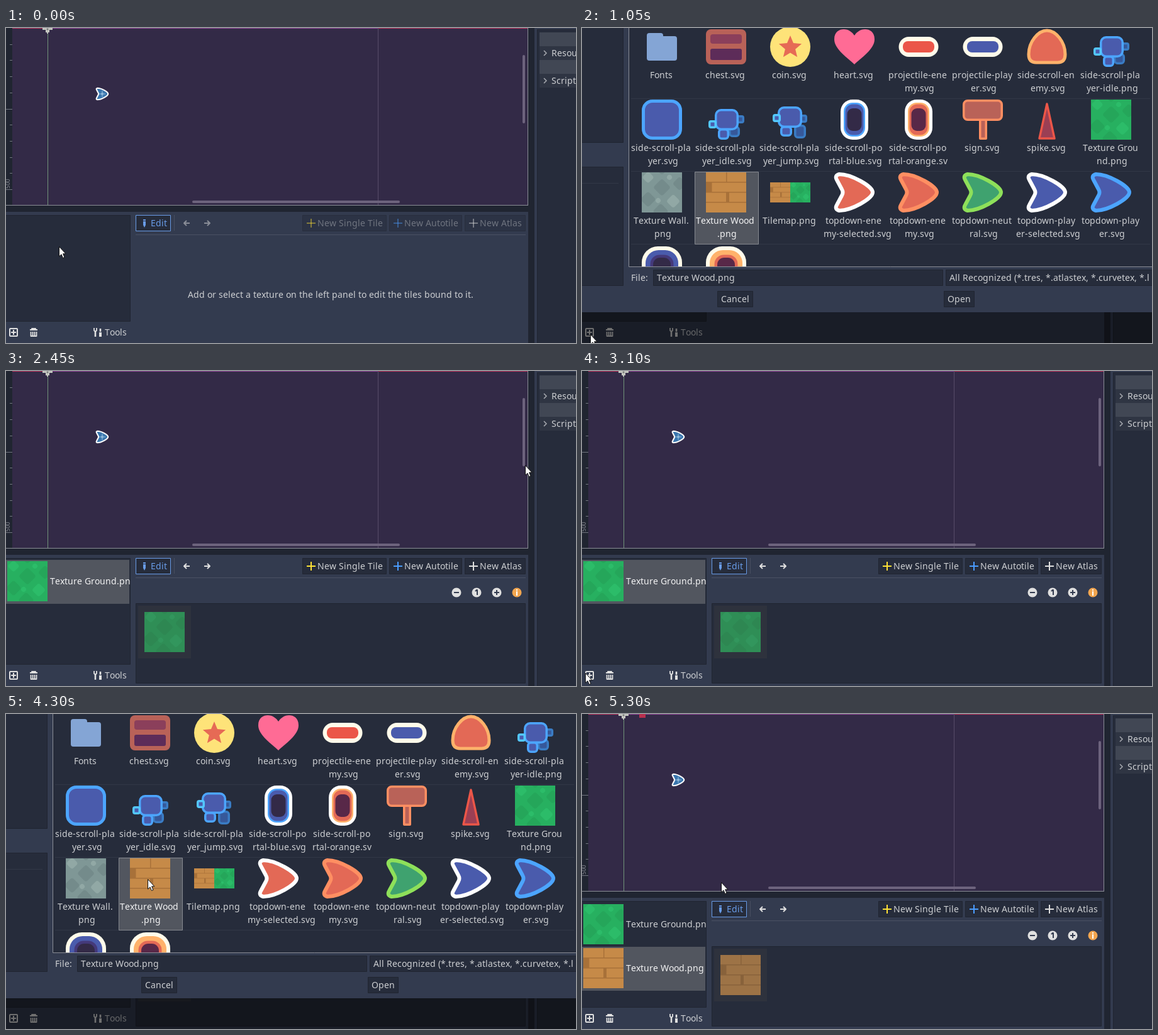
Write an HTML page with a canvas that moves like this. It is 906x502 px and loops after 5.35 s.

```html
<!DOCTYPE html>
<html lang="en">
<head>
<meta charset="utf-8">
<title>Adding textures to a tile set</title>
<style>
  html, body { margin: 0; width: 100%; height: 100%; overflow: hidden; background: #202531; }
  canvas { display: block; }
</style>
</head>
<body>
<canvas id="stage" width="906" height="502"></canvas>
<script>
const g = document.getElementById('stage').getContext('2d');
const LOOP = 5350, STEP = 50;
const BASE = '#333b4f', DARK = '#262c3b', DARKER = '#202531', FONT = '#cdcfd2', ICON = '#e0e0e0';
const ACCENT = '#699ce8', BLUE = '#4a5bac', SKY = '#4ca5ff', RED = '#e36956', ORANGE = '#ff8f62';
const AMBER = '#ffb26b', CREAM = '#fffbea', NIGHT = '#332a47', WINE = '#582848', BRICK = '#b96258';

// ---- drawing helpers ----
const rect = (x, y, w, h, color) => { g.fillStyle = color; g.fillRect(x, y, w, h); };

function box(x, y, w, h, r, fill, stroke, line = 1) {
  const inset = stroke ? line / 2 : 0;
  g.beginPath();
  g.roundRect(x + inset, y + inset, w - 2 * inset, h - 2 * inset, Math.max(0, r - inset));
  if (fill) { g.fillStyle = fill; g.fill(); }
  if (stroke) { g.strokeStyle = stroke; g.lineWidth = line; g.stroke(); }
}

function shape(d, x, y, fill, stroke, line = 2, scale = 1) {
  const path = new Path2D(d);
  g.save();
  g.translate(x, y);
  g.scale(scale, scale);
  g.lineJoin = 'round';
  if (fill) { g.fillStyle = fill; g.fill(path); }
  if (stroke) { g.strokeStyle = stroke; g.lineWidth = line; g.stroke(path); }
  g.restore();
}

function clipped(x, y, w, h, draw) {
  g.save();
  g.beginPath();
  g.rect(x, y, w, h);
  g.clip();
  draw();
  g.restore();
}

// Glyphs advance by whole pixels, as in the editor's hinted font.
const advance = c => Math.round(g.measureText(c).width);
const textWidth = s => [...s].reduce((w, c) => w + advance(c), 0);
function text(s, x, y, color = FONT) {
  g.fillStyle = color;
  for (const c of s) { g.fillText(c, x, y); x += advance(c); }
}

const disc = (x, y, r, color) => box(x - r, y - r, 2 * r, 2 * r, r, color);
const plus = (x, y, r, w, color) => {
  rect(x - r, y - w / 2, 2 * r, w, color);
  rect(x - w / 2, y - r, w, 2 * r, color);
};
// Concentric rounded boxes: [halfWidth, halfHeight, radius, color]
const nested = (x, y, layers) => layers.forEach(([w, h, r, color]) => box(x - w, y - h, 2 * w, 2 * h, r, color));

// ---- textures ----
function inTile(x, y, size, draw) {
  g.save();
  g.translate(x, y);
  g.scale(size / 64, size / 64);
  clipped(0, 0, 64, 64, draw);
  g.restore();
}

const stones = (base, dark, light) => (x, y, size = 64) => inTile(x, y, size, () => {
  rect(0, 0, 64, 64, base);
  const stone = (cx, cy, r, color) => {
    g.save();
    g.translate(cx, cy);
    g.rotate(Math.PI / 4);
    box(-r, -r, 2 * r, 2 * r, 4, color);
    g.restore();
  };
  [[32, 24, 10], [10, 43, 9], [60, 18, 8], [30, 62, 9], [32, -4, 6]].forEach(s => stone(...s, dark));
  [[10, 8, 7], [50, 46, 8], [44, 8, 4], [26, 45, 4]].forEach(s => stone(...s, light));
});
const ground = stones('#27b060', '#25a65a', '#2cbc69');
const wall = stones('#7f9796', '#748b8b', '#91a8a5');

const wood = (x, y, size = 64) => inTile(x, y, size, () => {
  rect(0, 0, 64, 64, '#c68a48');
  [15, 31, 47].forEach(row => rect(0, row, 64, 1.5, '#a87139'));
  rect(32, 0, 1.5, 16, '#a87139');
  rect(0, 16, 9.5, 15, '#a87139');
  rect(32, 32, 5, 15, '#a87139');
});

// ---- file icons, drawn around their centre ----
const SHIP = 'M-24-29C-5-29 29-10 29 0C29 10-5 29-24 29Q-32 27-28 20L-20 5Q-17 0-20-5L-28-20Q-32-27-24-29Z';
const ship = (fill, stroke) => (x, y) => shape(SHIP, x, y, fill, stroke, 6);
const pill = (outer, inner) => (x, y) => nested(x, y, [[31.5, 16, 16, outer], [25, 9, 8, inner]]);
const portal = (ring, body, core) => (x, y) =>
  nested(x, y, [[22, 32, 19, 'white'], [17, 27, 14, ring], [14.5, 24.5, 12, body], [11.5, 18, 9, core]]);
const dome = (...colors) => (x, y) => nested(x, y, colors.map((c, i) => {
  const r = [32, 26, 18.5, 14][i];
  return [r, r, r * .8, c];
}));

const part = (x, y, w, h, r, fill, stroke) => box(x, y, w, h, r, fill, stroke, 3.5);
function idle(x, y) {
  part(x + 16, y - 7, 13, 13, 4, '#36589a', '#3a7cc4');
  part(x + 4, y + 10, 18, 18, 6, '#36589a', '#3a7cc4');
  part(x - 18, y - 17, 38, 34, 10, BLUE, SKY);
  part(x - 28, y + 1, 13, 13, 4, BLUE, '#53c8ff');
  part(x - 13, y + 14, 18, 18, 6, BLUE, SKY);
}
function jump(x, y) {
  part(x + 15, y - 8, 12, 13, 4, '#36589a', '#3a7cc4');
  part(x + 6, y + 8, 19, 22, 6, '#36589a', '#3a7cc4');
  part(x - 20, y - 21, 39, 34, 10, BLUE, SKY);
  part(x - 28, y - 9, 13, 13, 4, BLUE, '#53c8ff');
  part(x - 16, y + 10, 19, 17, 6, BLUE, SKY);
}
const folder = (x, y) => {
  box(x - 24, y - 22, 26, 20, 4, '#84a5d5');
  box(x - 24, y - 17, 48, 39, 4, '#84a5d5');
};
const chest = (x, y) => {
  box(x - 32, y - 28, 64, 56, 8, BRICK);
  box(x - 25, y - 20, 50, 15, 4, '#8b3f5b');
  box(x - 25, y + 3, 50, 18, 3, '#5d2c59');
};
const coin = (x, y) => {
  disc(x, y, 32, '#fee379');
  const points = Array.from({ length: 10 }, (_, i) => {
    const a = i * Math.PI / 5, r = i % 2 ? 8.5 : 19;
    return `${r * Math.sin(a)} ${1 - r * Math.cos(a)}`;
  });
  shape(`M${points.join('L')}Z`, x, y, '#e66a55');
};
const heart = (x, y) => shape('M0 28C-10 18-32 4-32-12C-32-24-24-28-17-28C-9-28-3-23 0-18C3-23 9-28 17-28C24-28 32-24 32-12C32 4 10 18 0 28Z', x, y, '#ff6b95');
const blob = (x, y) => shape('M-17 25Q-29 25-29 12C-29-8-14-26 0-26C14-26 29-8 29 12Q29 25 17 25Z', x, y, RED, AMBER, 5);
const square = (x, y) => box(x - 32, y - 32, 64, 64, 17, BLUE, SKY, 5);
const sign = (x, y) => {
  box(x - 6, y - 2, 13, 34, 2, BRICK, ORANGE, 3.5);
  box(x - 32, y - 32, 64, 34, 8, BRICK, ORANGE, 3.5);
};
const spike = (x, y) => shape('M0-25L12 30H-12Z', x, y, '#9b3f54', '#eb5648', 3.5);
const tilemap = (x, y) => { wood(x - 32, y - 16, 32); ground(x, y - 16, 32); };
const tile = texture => (x, y) => texture(x - 32, y - 32);

const FILES = [
  ['Fonts', folder], ['chest.svg', chest], ['coin.svg', coin], ['heart.svg', heart],
  ['projectile-ene|my.svg', pill(CREAM, '#eb5648')], ['projectile-play|er.svg', pill(CREAM, BLUE)],
  ['side-scroll-en|emy.svg', blob], ['side-scroll-pla|yer-idle.png', idle],
  ['side-scroll-pla|yer.svg', square], ['side-scroll-pla|yer_idle.svg', idle], ['side-scroll-pla|yer_jump.svg', jump],
  ['side-scroll-po|rtal-blue.svg', portal(SKY, BLUE, NIGHT)], ['side-scroll-po|rtal-orange.sv', portal(AMBER, RED, WINE)],
  ['sign.svg', sign], ['spike.svg', spike], ['Texture Grou|nd.png', tile(ground)],
  ['Texture Wall.|png', tile(wall)], ['Texture Wood|.png', tile(wood)], ['Tilemap.png', tilemap],
  ['topdown-ene|my-selected.svg', ship(RED, 'white')], ['topdown-ene|my.svg', ship(RED, ORANGE)],
  ['topdown-neut|ral.svg', ship('#3fa26f', '#8ee05a')], ['topdown-play|er-selected.svg', ship(BLUE, 'white')],
  ['topdown-play|er.svg', ship(BLUE, SKY)],
  ['', dome(CREAM, BLUE, '#44397a', NIGHT)], ['', dome(CREAM, AMBER, RED, WINE)]
];
const GROUND = 15, WOOD = 17;

// ---- editor window ----
function viewport(hover) {
  rect(10, 0, 819, 282, NIGHT);
  for (let k = 1; k < 11; k++) {
    const long = k % 5 === 0;
    rect(long ? 0 : 6, Math.round(k * 25.7), long ? 10 : 4, 1, '#727680');
  }
  g.save();
  g.translate(6, 256);
  g.rotate(-Math.PI / 2);
  g.font = '9px "Noto Sans", sans-serif';
  g.fillStyle = '#8a8d94';
  g.fillText('500', 0, 0);
  g.restore();

  rect(10, 0, 819, 1, '#b9345a');
  rect(66, 0, 525, 1, '#8f4596');
  rect(591, 0, 1, 282, '#574d69');
  rect(66, 0, 1, 282, '#72957a');
  box(821, 43, 4, 109, 2, '#6d637d');
  box(296, 275, 330, 4, 2, '#6d637d');
  rect(0, 282, 830, 1, '#8b8e97');
  rect(829, 0, 1, 283, '#8b8e97');

  shape('M-8 0H8V3H3V7H1V9H-1V7H-3V3H-8Z', 66, 0, '#c4c6c0');
  disc(66, 2, 1.5, '#777a7a');
  if (hover) rect(91, 0, 10, 6, '#b9304f');
  shape(SHIP, 153, 105, '#3a76ae', 'white', 6.5, .32);
  plus(153, 105, 5, 1, '#8fb9da');
  disc(153, 105, 2, '#8fb9da');
}

function inspector() {
  rect(840, 0, 66, 502, BASE);
  rect(844, 2, 62, 500, DARKER);
  rect(845, 3, 61, 499, DARK);
  ['Resource', 'Script'].forEach((name, i) => {
    const y = 7 + 44 * i;
    rect(848, y, 58, 22, '#414754');
    rect(848, y + 22, 58, 22, '#2f3543');
    shape('M0-4L4 0L0 4', 855, y + 33, null, '#a6a9af', 1.6);
    text(name, 867, y + 38);
  });
}

function toolbar(active) {
  box(206, 298, 56, 26, 0, DARK, ACCENT);
  shape('M-2-6H2V3L0 7L-2 3Z', 220, 311, ACCENT);
  rect(218, 307, 4, 1, DARK);
  text('Edit', 230, 316, ACCENT);
  rect(267, 298, 1, 25, '#474e60');
  g.globalAlpha = active ? 1 : .5;
  shape('M5 0H-3M0-4L-4 0L0 4', 287, 311, null, ICON);
  shape('M-5 0H3M0-4L4 0L0 4', 320, 311, null, ICON);
  g.globalAlpha = 1;
  [[471, 134, 'New Single Tile', '#ffe236'], [609, 116, 'New Autotile', '#4a9cff'], [729, 97, 'New Atlas', ICON]]
    .forEach(([x, w, label, color]) => {
      box(x, 298, w, 26, 0, active ? DARK : '#2c3345', active ? DARKER : '#282e3d');
      g.globalAlpha = active ? 1 : .42;
      plus(x + 14, 311, 7, 2, color);
      text(label, x + 24, 316);
      g.globalAlpha = 1;
    });
  rect(206, 329, 620, 1, '#4a5163');
}

function textureEditor(texture) {
  [716, 748, 780].forEach(x => disc(x, 353, 7.5, ICON));
  rect(712, 352, 8, 2, BASE);
  shape('M-2-2L0-4H1V4', 748, 353, null, BASE);
  plus(780, 353, 4, 2, BASE);
  disc(812, 353, 7.5, '#f2a650');
  rect(811, 348, 2, 2, 'white');
  rect(811, 351, 2, 7, 'white');
  box(206, 370, 620, 128, 0, DARK, DARKER);
  texture(220, 384);
  rect(210, 374, 84, 84, 'rgba(64,64,64,.31)');
}

function textureList(items) {
  box(-1, 298, 199, 170, 0, DARK, DARKER);
  items.forEach(([name, texture], i) => {
    const y = 301 + 70 * i, selected = i === items.length - 1;
    if (selected) rect(0, y, 196, 70, '#52565f');
    texture(2, y + 2);
    clipped(0, y, 197, 70, () => text(name, 70, y + 39, selected ? '#f2f2f3' : FONT));
  });
  box(5, 478, 14, 14, 2, null, ICON, 2);
  plus(12, 485, 4, 2, ICON);
  shape('M-6-4H6M-3-5V-6H3V-5M-4.5-1V6H4.5V-1M-1.5-1V5M1.5-1V5', 44, 485, null, ICON, 1.8);
  shape('M-4-1V7M4-6V-1', 146, 485, null, ICON, 2.6);
  shape('M-6-7V-3L-4-1L-2-3V-7M4 1V7', 146, 485, null, ICON, 1.8);
  rect(148, 485, 4, 7, ICON);
  text('Tools', 157, 490);
}

function editor(items, hover) {
  rect(0, 0, 906, 502, DARKER);
  viewport(hover);
  inspector();
  rect(0, 293, 830, 209, BASE);
  textureList(items);
  toolbar(items.length > 0);
  if (items.length) textureEditor(items.at(-1)[1]);
  else text('Add or select a texture on the left panel to edit the tiles bound to it.', 289, 430);
}

// ---- file dialog ----
function fileCell([label, icon], index, selected) {
  const col = index % 8, row = index >> 3, x = 78 + 102 * col, y = 116 * row;
  if (selected) box(x - 1 + 2 * (col === 0), y - 3, 102, 116, 0, '#52565f', '#85888f');
  icon(127 + 102 * col, y + 30 + (row === 3 ? 2 : 0));
  label.split('|').forEach((line, i) => {
    const center = i && line.endsWith('g') ? 51 : 48;
    text(line, Math.max(x, Math.floor(x + center - textWidth(line) / 2)), y + 80 + 21 * i, selected ? '#f2f2f3' : FONT);
  });
}

function dialog(selected) {
  const field = (x, y, w, h) => box(x, y, w, h, 0, DARK, DARKER);
  rect(0, 0, 906, 502, 'rgba(0,0,0,.5)');
  rect(0, 0, 906, 453, BASE);
  field(-1, -1, 67, 184);
  field(-1, 221, 67, 190);
  rect(0, 247, 58, 1, '#323847');
  box(74, -2, 834, 383, 0, DARK, '#8b8e97');
  [112, 228, 344].forEach(y => rect(78, y, 825, 1, '#313746'));
  clipped(75, 0, 831, 380, () => FILES.forEach((file, i) => fileCell(file, i, i === selected)));

  text('File:', 78, 403);
  field(113, 385, 461, 26);
  text(selected === WOOD ? 'Texture Wood.png' : 'Texture Ground.png', 119, 403);
  field(578, 385, 330, 26);
  text('All Recognized (*.tres, *.atlastex, *.curvetex, *.l', 584, 403);
  field(215, 419, 57, 26);
  text('Cancel', 221, 437);
  field(575, 419, 49, 26);
  text('Open', 581, 437);
}

// ---- timeline ----
const MOUSE = [ // time, x, y
  [100, 84, 348], [350, 42, 428], [550, 6, 476], [650, 13, 484], [700, 13, 488], [1450, 13, 488],
  [1600, 220, 380], [1800, 760, 130], [1900, 830, 95], [2000, 828, 133], [2050, 825, 150], [2700, 825, 150],
  [2950, 29, 447], [3000, 12, 472], [3100, 5, 481], [3600, 5, 481], [3650, 96, 394], [3800, 190, 300],
  [3950, 225, 263], [5150, 225, 263], [5300, 221, 268]
];

function mouseAt(t) {
  const next = MOUSE.findIndex(key => key[0] > t);
  if (next < 1) return (next ? MOUSE.at(-1) : MOUSE[0]).slice(1);
  const [t0, x0, y0] = MOUSE[next - 1], [t1, x1, y1] = MOUSE[next];
  const k = (t - t0) / (t1 - t0);
  return [Math.round(x0 + (x1 - x0) * k), Math.round(y0 + (y1 - y0) * k)];
}

function draw(now) {
  const t = Math.floor(now % LOOP / STEP) * STEP;
  g.font = '14px "Noto Sans", sans-serif';
  const items = [];
  if (t >= 2450) items.push(['Texture Ground.png', ground]);
  if (t >= 4650) items.push(['Texture Wood.png', wood]);
  editor(items, t >= 5200);
  if ((t >= 1050 && t < 2450) || (t >= 3650 && t < 4650)) {
    dialog(t < 2200 || t >= 4250 ? WOOD : GROUND);
  }
  shape('M.5.5V16L4 12.8L6.5 18.5L9 17.4L6.6 11.8H11Z', ...mouseAt(t), 'white', '#111', 1);
  requestAnimationFrame(draw);
}
requestAnimationFrame(draw);
</script>
</body>
</html>
```
